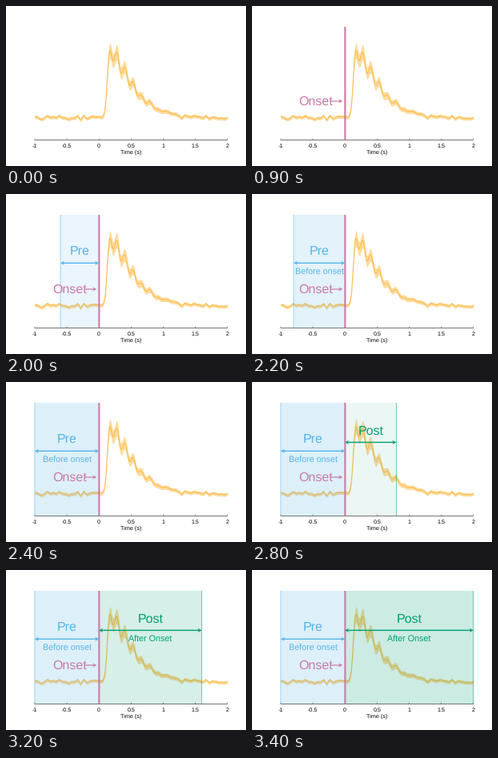
These frames come from a looping animation (300x200 px, 5 s). A matplotlib script:

```python
import numpy as np
import matplotlib.pyplot as plt
from matplotlib.animation import FuncAnimation
from matplotlib.patches import Polygon, Rectangle

plt.rcParams["font.family"] = "Liberation Sans"
plt.rcParams["text.hinting"] = "none"
plt.rcParams["path.snap"] = False

W, H, DPI = 300, 200, 100
STEP, LOOP = 100, 5000
PT = 72 / DPI
X0, UNIT = 116.2, 80.3
TOP, BASE, REST = 26, 167.4, 139.5
ORANGE, PINK, BLUE, GREEN = "#fdb940", "#cc79a7", "#56b4e9", "#009e73"

fig = plt.figure(figsize=(W / DPI, H / DPI), dpi=DPI, facecolor="white")
ax = fig.add_axes([0, 0, 1, 1])
ax.set_xlim(0, W)
ax.set_ylim(H, 0)
ax.axis("off")


def to_x(t):
    return X0 + UNIT * t


def label(x, y, s, size, color="black", ha="center"):
    return ax.text(x, y, s, fontsize=size * PT, color=color, ha=ha,
                   va="baseline", zorder=7)


def line(xs, ys, color, width, z=5, **kw):
    return ax.plot(xs, ys, color=color, lw=width * PT, zorder=z,
                   solid_capstyle="butt", **kw)[0]


def head_points(x, y, way, size=5):
    back, notch, half = x - way * size, x - way * size * 0.7, size * 0.52
    return [(x, y), (back, y - half), (notch, y), (back, y + half)]


def head(x, y, way, color):
    return ax.add_patch(Polygon(head_points(x, y, way), fc=color, ec="none",
                                zorder=6))


def draw_axis():
    line([to_x(-1), to_x(2)], [BASE, BASE], "#555555", 0.8, z=4)
    for t in np.arange(-1, 2.1, 0.5):
        line([to_x(t)] * 2, [BASE, BASE - 2], "#555555", 0.6, z=4)
        label(to_x(t), 177.4, f"{t:g}", 7.2)
    label(to_x(0.5), 184.8, "Time (s)", 7.3)


def response(t):
    """Steep rise at the onset, rippled decay after the peak."""
    rise = 1 / (1 + np.exp((0.124 - t) / 0.017))
    decay = np.exp(-(np.clip(t - 0.16, 0, None) / 0.45) ** 1.4)
    ripple = 1 + 0.12 * np.cos(2 * np.pi * (t - 0.41) / 0.13)
    return 84 * rise * decay * ripple


def draw_trace():
    rng = np.random.default_rng(4)
    t = np.linspace(-1, 2, 181)
    knots = np.linspace(-1, 2, 64)
    noise = np.interp(t, knots, rng.normal(0, 1.5, knots.size))
    level = response(t)
    y = REST - level + noise
    spread = 2.1 + 0.095 * level
    x = to_x(t)
    ax.fill_between(x, y - spread, y + spread, color=ORANGE, alpha=0.5,
                    lw=0, zorder=1)
    line(x, y, ORANGE, 0.9, z=2, solid_joinstyle="round")


class Window:
    """Shaded span that grows away from the onset, with its captions."""

    def __init__(self, end, color, arrow_y, name, note):
        self.end, self.y = end, arrow_y
        self.fill = ax.add_patch(Rectangle((X0, TOP), 0, BASE - TOP, fc=color,
                                           ec="none", zorder=3))
        self.edge = line([X0, X0], [TOP, BASE], color, 0.9, z=4, alpha=0.6)
        self.shaft = line([X0, X0], [arrow_y] * 2, color, 1.4, z=6)
        self.tips = [head(X0, arrow_y, 1, color) for _ in range(2)]
        self.name = label(X0, arrow_y - 10, name, 16, color)
        self.note = label(X0, arrow_y + 14.4, note, 10.8, color)
        self.parts = [self.fill, self.edge, self.shaft, *self.tips]

    def update(self, p):
        p = min(max(p, 0), 1)
        x = to_x(self.end * p)
        way = np.sign(self.end)
        for part in self.parts:
            part.set_visible(p > 0)
        self.fill.set_width(x - X0)
        self.fill.set_alpha(0.2 * p)
        self.edge.set_xdata([x, x])
        self.shaft.set_xdata([X0 + 2 * way, x - 2 * way])
        self.tips[0].set_xy(head_points(x, self.y, way))
        self.tips[1].set_xy(head_points(X0, self.y, -way))
        # captions show once the span has room for them
        for text, room in ((self.name, 0.29), (self.note, 0.69)):
            text.set_x((X0 + x) / 2)
            text.set_visible(p > room)


draw_axis()
draw_trace()
pre = Window(-1, BLUE, 86.3, "Pre", "Before onset")
post = Window(2, GREEN, 75.4, "Post", "After Onset")
onset_line = line([X0 + 0.2] * 2, [TOP, BASE], PINK, 2.1, z=5)
onset = [label(58.4, 124.3, "Onset", 16, PINK, ha="left"),
         line([98, 110.5], [119, 119], PINK, 1.2, z=6),
         head(113.3, 119, 1, PINK)]


def update(i):
    ms = i * STEP
    onset_line.set_visible(ms >= 400)
    for part in onset:
        part.set_visible(ms >= 900)
    pre.update((ms - 1400) / 1000)
    post.update((ms - 2400) / 1000)
    return []


anim = FuncAnimation(fig, update, frames=LOOP // STEP, interval=STEP,
                     repeat=True, repeat_delay=0, blit=False)
plt.show()
```
